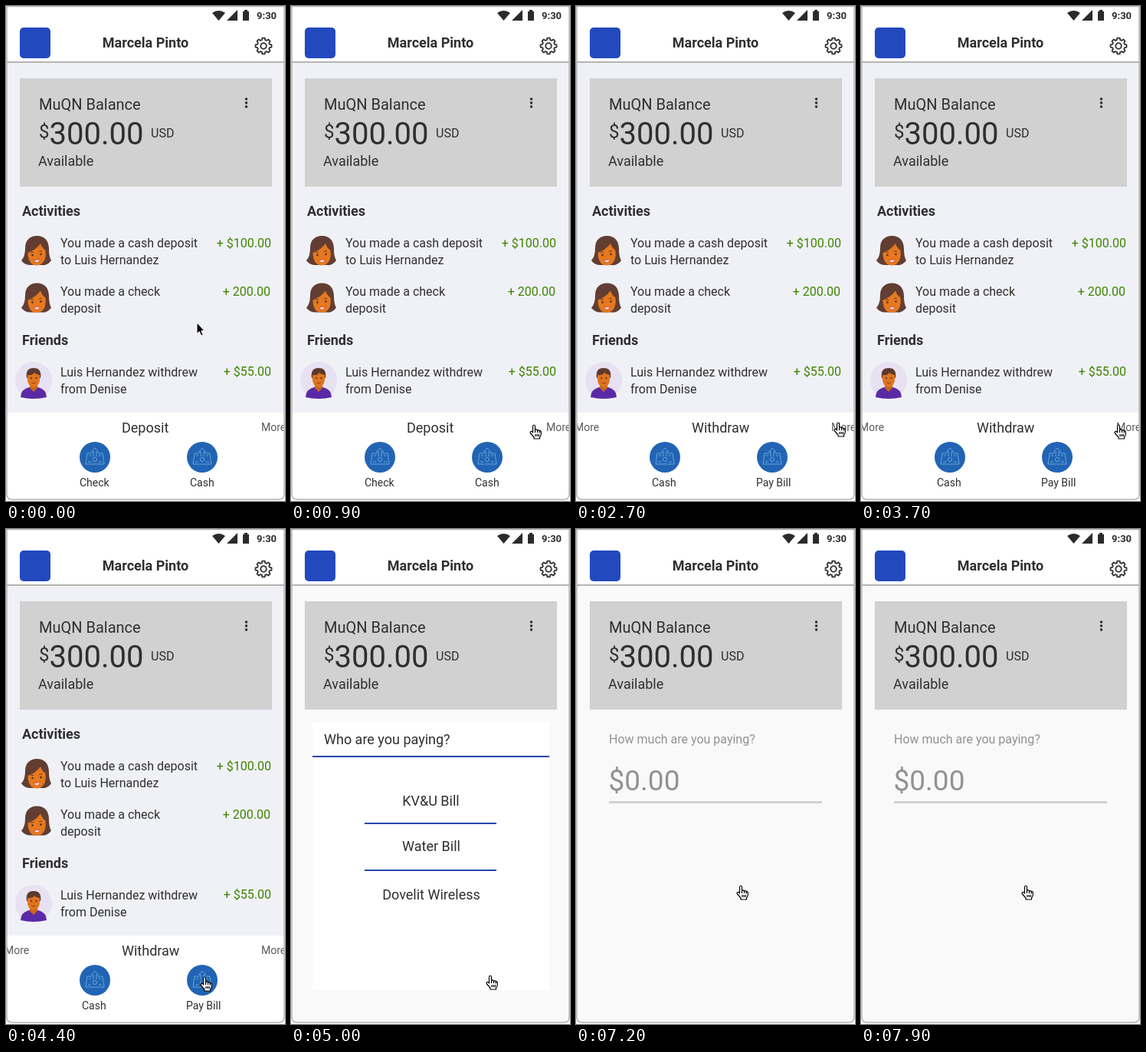
An HTML page that plays this animation: 364x644 px, repeating every 8000 ms.

```html
<!DOCTYPE html>
<html lang="en">
<head>
<meta charset="utf-8">
<title>Wallet prototype</title>
<style>
  html, body { margin: 0; width: 100%; height: 100%; overflow: hidden; background: #fff; }
  svg { display: block; width: 364px; height: 644px; }
  text { font-family: Roboto, sans-serif; font-size: 16px; fill: #2f2f2f; white-space: pre; }
  .s { font-size: 14px; }
  .m { font-size: 18px; }
  .l { font-size: 20px; }
  .b { font-weight: 700; }
  .mid { text-anchor: middle; }
  .more { font-size: 14px; fill: #5c5c5c; }
  .gain { fill: #3d8400; text-anchor: end; }
  .pale { fill: #929292; }
</style>
</head>
<body>
<svg viewBox="0 0 364 644">
  <defs>
    <clipPath id="phone"><path d="M1 0H363V635Q363 642 356 642H8Q1 642 1 635Z"/></clipPath>
    <g id="woman">
      <path d="M20 331Q25 326 25 315C25 304 32 299 40 299C51 299 56 306 56 316Q56 326 59 331Q54 338 47 337H32Q24 337 20 331Z" fill="#623e32"/>
      <path d="M28.500 321Q38 318 45 309Q47 315 51.500 318Q53 330 47 335Q40 340 33 335Q28.500 330 28.500 321Z" fill="#e6781f"/>
      <path d="M32 321q2-1.500 4-.5M43 319.500q2-1.500 4 0" fill="none" stroke="#623e32"/>
      <circle cx="34.500" cy="324" r="1.2" fill="#3f261d"/><circle cx="45.500" cy="323" r="1.2" fill="#3f261d"/>
      <path d="M36.500 330.500Q40.500 331 44 329.500Q43.500 333.500 40.500 333.500T36.500 330.500Z" fill="#fff" stroke="#d34136" stroke-width=".8"/>
    </g>
    <g id="note">
      <circle r="20" fill="#2264b4"/>
      <g fill="none" stroke="#74b4e4" stroke-width=".8">
        <path d="M-4-5H-10L-12 9H12L10-5H4M-8-2H-5M5-2H8M-9 6H-5M5 6H9M-2-1V-7H-4.500L0-12L4.500-7H2V-1"/>
        <circle cy="3" r="2.600"/>
      </g>
    </g>
  </defs>

  <g clip-path="url(#phone)">
    <rect width="364" height="644" fill="#f0f1f7"/>
    <text class="m b" x="21" y="273">Activities</text>
    <use href="#woman"/>
    <text x="71" y="314">You made a cash deposit</text>
    <text x="71" y="336">to Luis Hernandez</text>
    <text class="gain" x="346" y="314">+ $100.00</text>
    <use href="#woman" y="61.5"/>
    <text x="71" y="377">You made a check</text>
    <text x="71" y="399">deposit</text>
    <text class="gain" x="345" y="377">+ 200.00</text>
    <text class="m b" x="21" y="441">Friends</text>
    <circle cx="36" cy="487" r="24" fill="#e7e1f2"/>
    <path d="M19 509Q19 499 30 496H42Q53 499 53 509Q36 513 19 509Z" fill="#5a2aa6"/>
    <path d="M31 490H41V497L36 502L31 497Z" fill="#c9651a"/>
    <path d="M27 484Q25 471 36 471T45 484Z" fill="#5c3a2e"/>
    <path d="M28 480Q34 481 37 477Q40 480 44 480V485C44 492 40 496 36 496S28 492 28 485Z" fill="#df731e"/>
    <circle cx="33" cy="484" r="1" fill="#3f261d"/><circle cx="39.500" cy="484" r="1" fill="#3f261d"/>
    <path d="M33.500 490Q36 492 38.500 490" fill="none" stroke="#8e3b1b"/>
    <text x="71" y="482">Luis Hernandez withdrew</text>
    <text x="71" y="504">from Denise</text>
    <text class="gain" x="346" y="481">+ $55.00</text>

    <rect y="529" width="364" height="115" fill="#fff"/>
    <g id="deposit">
      <text class="m" x="151" y="555">Deposit</text>
      <text class="s" x="96" y="625">Check</text>
      <text class="s" x="240" y="625">Cash</text>
    </g>
    <g id="withdraw">
      <text class="more" x="-2" y="553">More</text>
      <text class="m" x="151" y="555">Withdraw</text>
      <text class="s" x="99" y="625">Cash</text>
      <text class="s" x="235" y="625">Pay Bill</text>
    </g>
    <text class="more" x="333" y="553">More</text>
    <use href="#note" x="116" y="587"/>
    <use href="#note" x="256" y="587"/>

    <g id="bills">
      <rect width="364" height="644" fill="#f9f9f9"/>
      <rect x="28" y="251" width="309" height="349" fill="#fff"/>
      <text class="m" x="43" y="280">Who are you paying?</text>
      <path d="M28 296H337M96 383H268M96 444H268" stroke="#2548ac" stroke-width="2"/>
      <text class="m mid" x="182.5" y="360">KV&amp;U Bill</text>
      <text class="m mid" x="183" y="419">Water Bill</text>
      <text class="m mid" x="183" y="482">Dovelit Wireless</text>
    </g>

    <g id="amount">
      <rect width="364" height="644" fill="#f9f9f9"/>
      <text class="pale" x="43" y="279">How much are you paying?</text>
      <text class="pale" x="42.5" y="340" style="font-size:37px">$0.00</text>
      <path d="M43 355.5H321" stroke="#d2d2d2" stroke-width="3"/>
    </g>

    <rect width="364" height="73" fill="#fff"/>
    <path d="M0 73H364" stroke="#b4b4b4" stroke-width="2"/>
    <rect x="18" y="28" width="40" height="40" rx="5" fill="#2249bd"/>
    <text class="m b mid" x="182" y="54">Marcela Pinto</text>
    <g fill="#2b2b2b">
      <path d="M269 9Q277.500 3 286 9L277.500 19ZM302 5V19H288ZM309 7H311V5H315V7H317V19H309Z"/>
      <text class="b" x="327" y="17" style="font-size:13px">9:30</text>
    </g>
    <g transform="translate(336 52)" fill="none" stroke="#333" stroke-width="1.8" stroke-linejoin="round">
      <path id="gear"/><circle r="3.8"/>
    </g>

    <rect x="18" y="94" width="329" height="141" fill="#d1d1d1"/>
    <text class="l" x="43" y="135">MuQN Balance</text>
    <text x="43" y="172" style="font-size:24px">$</text>
    <text x="56.500" y="180" style="font-size:40px">300.00</text>
    <text x="189" y="171">USD</text>
    <text class="m" x="42" y="208">Available</text>
    <path d="M313.500 121v0M313.500 126v0M313.500 131v0" stroke="#2f2f2f" stroke-width="3.6" stroke-linecap="round"/>
  </g>
  <path d="M1 0V635Q1 642 8 642H356Q363 642 363 635V0M0 .5H364" fill="none" stroke="#b2b2b2" stroke-width="1.500"/>

  <g id="pointer" stroke-linejoin="round">
    <path id="arrow" d="M-1-8V6.500L2.300 3.500L4.700 9L7.200 8L4.800 2.600H9Z" fill="#000" stroke="#fff"/>
    <path id="hand" d="M-3.500 1V-7Q-3.500-9-2-9T-.5-7V-2.500Q1-4 2.500-2Q4-3 5.200-1.300Q7-2 7.300 .5V3Q7 5.500 5.500 7V9H-2V7L-6.500 2Q-7.500 0-6-.5T-3.500 1ZM-.5-2.500V1M2.500-2V1M5.200-1.300V1.500M0 3V6M2.200 3V6M4.300 3V6" fill="#fff" stroke="#000" stroke-width="1.200"/>
  </g>
</svg>
<script>
const LOOP = 8000;
const $ = id => document.getElementById(id);

// pointer stops: time, x, y
const stops = [
  [0, 250, 420], [100, 250, 420], [900, 319, 554], [1200, 344, 551],
  [3600, 344, 551], [4200, 261, 592], [4500, 261, 592], [4900, 262, 590],
  [5750, 262, 590], [6150, 226, 492], [6250, 226, 492], [6600, 222, 479],
  [7300, 217, 473], [LOOP, 217, 473]
];

const ramp = (t, from, to) => Math.min(1, Math.max(0, (t - from) / (to - from)));
const smooth = p => p * p * (3 - 2 * p);

function pointerAt(t) {
  const i = stops.findIndex(s => s[0] > t);
  const [t0, x0, y0] = stops[i - 1], [t1, x1, y1] = stops[i];
  const p = smooth(ramp(t, t0, t1));
  return [x0 + (x1 - x0) * p, y0 + (y1 - y0) * p];
}

function gearPath() {
  const points = [];
  for (let tooth = 0; tooth < 8; tooth++)
    for (const [turn, r] of [[-15, 8.2], [-9, 10.6], [9, 10.6], [15, 8.2]]) {
      const a = (tooth * 45 + turn) * Math.PI / 180;
      points.push(`${(r * Math.sin(a)).toFixed(2)} ${(-r * Math.cos(a)).toFixed(2)}`);
    }
  return `M${points.join("L")}Z`;
}

function draw(now) {
  const t = now % LOOP;
  const swap = smooth(ramp(t, 1350, 1650));
  $("deposit").style.opacity = 1 - swap;
  $("withdraw").style.opacity = swap;
  $("bills").style.opacity = smooth(ramp(t, 4550, 4850));
  $("amount").style.opacity = smooth(ramp(t, 6350, 6650));

  const [x, y] = pointerAt(t);
  const overLink = t > 1000 || y > 529;
  $("pointer").setAttribute("transform", `translate(${Math.round(x)} ${Math.round(y)})`);
  $("arrow").style.display = overLink ? "none" : "";
  $("hand").style.display = overLink ? "" : "none";
}

$("gear").setAttribute("d", gearPath());
const start = performance.now();
function tick() {
  draw(performance.now() - start);
  requestAnimationFrame(tick);
}
tick();
</script>
</body>
</html>
```
